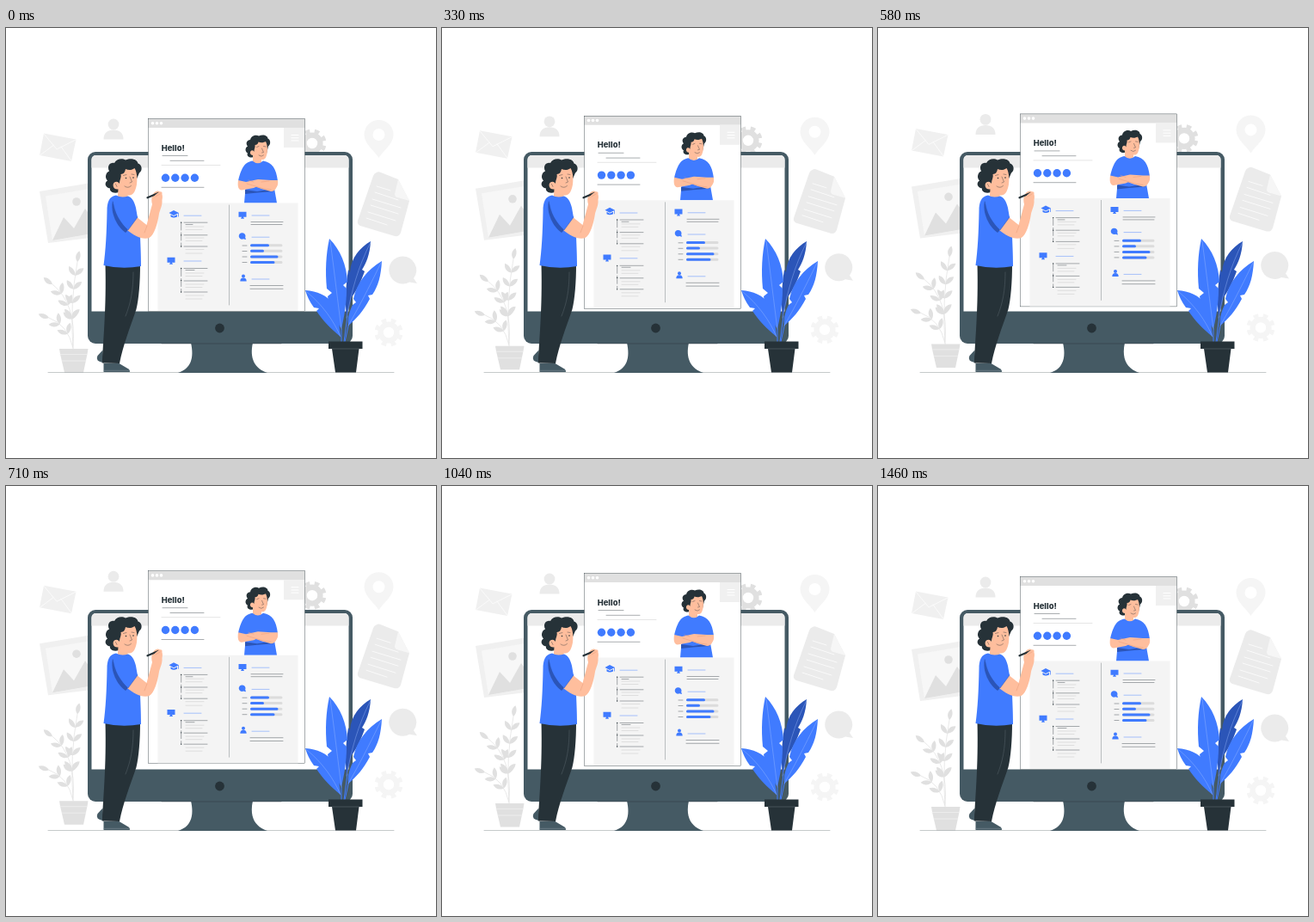
These frames come from a looping animation (500x500 px, 1500 ms). An HTML page:

```html
<!DOCTYPE html>
<html lang="en">
<head>
<meta charset="utf-8">
<title>Resume illustration</title>
<style>
  html, body { margin: 0; width: 100%; height: 100%; overflow: hidden; background: #fff; }
  svg { display: block; width: 100vw; height: 100vh; }
  path { stroke-linecap: round; stroke-linejoin: round; }
  .ink { fill: none; stroke: #263238; stroke-width: .4; }
  .faint { fill: none; stroke: #b4b4b4; stroke-width: .35; }
  .blueline { fill: none; stroke: #407bff; stroke-width: .45; }
  .blue { fill: #407bff; }
  .dark { fill: #263238; }
  .steel { fill: #455a64; }
  .skin { fill: #ffbe9d; }
  .shade { fill: #2b55b8; }
  .pale { fill: #e0e0e0; }
  .mist { fill: #f0f0f0; }
  .vein { fill: none; stroke: #a0bdff; stroke-width: .4; }
  text { font: 800 9.4px Inter, sans-serif; }
</style>
</head>
<body>
<svg viewBox="0 0 500 500">
  <defs>
    <g id="gear" fill="none">
      <circle r="9.4" stroke="currentColor" stroke-width="6.4"/>
      <circle r="14" stroke="currentColor" stroke-width="5" pathLength="16" stroke-dasharray="1 1" stroke-dashoffset="1.5"/>
    </g>
    <path id="screen" class="blue" d="M-4.5-4H4.5V2H-4.5ZM-1 2H1L2 4H-2Z"/>
  </defs>

  <!-- Background icons -->
  <g class="float">
    <path class="mist" d="M44 122.5L81.500 129.500L76 155L39 148Z"/>
    <path d="M44 123L59 141L81 130M39.500 148L55 136.500M76 154.500L64 138" fill="none" stroke="#fff" stroke-width=".7"/>
    <circle cx="125" cy="112" r="6.400" fill="#ebebeb"/>
    <path d="M113.500 129.500C113.500 122 118 118.500 125 118.500S136.500 122 136.500 129.500Z" fill="#ebebeb"/>
    <path class="mist" d="M39 190L105 179L114 242L49 250Z"/>
    <path d="M46 195.500L106 185.500L112 237L54 247Z" fill="#f7f7f7"/>
    <path class="pale" d="M54 247L67 220L79 233L92 210L112 237Z"/>
    <circle class="pale" cx="82" cy="202" r="4.800"/>
    <use href="#gear" x="356" y="134" color="#e0e0e0"/>
    <path fill="#f5f5f5" fill-rule="evenodd" d="M433.500 151C428 142 416.500 135 416.500 124A17 17 0 0 1 450.500 124C450.500 135 439 142 433.500 151ZM433.500 117A7 7 0 1 0 433.500 131A7 7 0 1 0 433.500 117"/>
    <path d="M431 168Q433 166.500 436 168L456 176L469 201L459 238Q457 243 452 242L412 230Q408 228 409 224L427 172Q428 169 431 168Z" fill="#ebebeb"/>
    <path d="M456 176L452 193Q452 196 455 197L469 201Z" fill="#f6f6f6"/>
    <path d="M431 184L447 189M429 191L456 200M426 199L459 209M424 206L456 216M421 214L453 224M419 221L443 229" stroke="#fafafa"/>
    <path d="M461 265.500A16 16 0 1 0 469 295.500L478 297L474 291A16 16 0 0 0 461 265.500Z" fill="#ebebeb"/>
    <use href="#gear" x="445" y="354" color="#f5f5f5"/>
    <g id="plant" class="pale">
      <path d="M62 373H95.500L94.500 379L90 400.500H68L63 379Z"/>
      <path d="M63 379.500H94.500M65 387H93" stroke="#f2f2f2" stroke-width=".7"/>
    </g>
  </g>

  <path d="M49 400.500H451" class="ink" stroke-opacity=".65"/>

  <!-- Monitor -->
  <path class="steel" d="M215 366C219 384 215 396 200 401H304C289 396 283 384 287 366Z"/>
  <rect class="steel" x="95" y="144" width="308" height="223" rx="9"/>
  <path d="M99.500 329.500V153.500Q99.500 148 105 148H393Q398.500 148 398.500 153.500V329.500Z" fill="#fff"/>
  <path d="M99.500 162.500V153.500Q99.500 148 105 148H393Q398.500 148 398.500 153.500V162.500Z" fill="#ebebeb"/>
  <path class="ink" d="M181 367H320"/>
  <circle class="dark" cx="248.500" cy="349" r="5.400"/>

  <!-- Resume page -->
  <g class="float">
    <rect x="165.500" y="105.500" width="182" height="224" fill="#fff"/>
    <path class="pale" d="M165.500 105.500H347.500V116H165.500Z"/>
    <g fill="#fff"><circle cx="170.500" cy="110.700" r="1.800"/><circle cx="175.500" cy="110.700" r="1.800"/><circle cx="180.500" cy="110.700" r="1.800"/></g>
    <path class="mist" d="M323 116H347.500V139H323Z"/>
    <path d="M332 124.500H340M332 127.800H340M332 131H340" stroke="#fff"/>
    <rect class="ink" x="165.500" y="105.500" width="182" height="224"/>
    <text class="dark" x="180.700" y="142.500">Hello!</text>
    <path class="ink" d="M182 148.500H211M191 154.300H230M181 185.300H230"/>
    <path class="faint" d="M181 159.500H249"/>
    <g class="blue"><circle cx="185.500" cy="174.300" r="4.700"/><circle cx="196.800" cy="174.300" r="4.700"/><circle cx="208.100" cy="174.300" r="4.700"/><circle cx="219.400" cy="174.300" r="4.700"/></g>

    <!-- Portrait -->
    <path class="dark" d="M286 150.500C282 151 279.500 148 281 145.500C277.500 143.500 278 139 281 137.500C278 134 280.500 130 284 130C285 125 291 123.500 294 125.500C299 123 304.500 125 304.500 128.500C308 130 308 135.500 305 137.500L303 146Z"/>
    <path class="skin" d="M287 157V148C283.500 148 283 143.500 285.500 142.500C287 142 288 143 288.500 144C288.500 140 290 139 289.500 136C292 136 293 134.500 293.500 132.500C297 134 300 133 302 132C305 138 304 146 302.500 149.500C301.500 152.500 299 153.500 297 153V157Q292 160 287 157Z"/>
    <path class="ink" d="M291.500 138.500L294 137.500M299.500 137.500L302 138M297.500 140L299.500 144.500L297.500 145M294 148Q297 150.500 299.500 148"/>
    <path class="blue" d="M286.500 154.500C279 156 274 160 270 178L279 181L277 203.500H315L311 181L316 178C314 163 310 157 299 154.500Q293 160 286.500 154.500Z"/>
    <path class="shade" d="M278 188L292 190L311 187V190L292 191.500L278 193Z"/>
    <path class="skin" d="M270 177C269 184 270 188 274 188.500L288 186L299 181L310 185C314 188 317 184 316 177L308 177L293 176L279 179Z"/>
    <path class="skin" d="M278 180L297 187L308 190Q313 190 315 184L300 178Z"/>
    <path d="M280 181L300 187L308 188M282 177L288 179M297 179L306 178" fill="none" stroke="#e69a78" stroke-width=".5"/>

    <path d="M176.500 203.500H339.500V329H176.500Z" fill="#f4f4f4"/>
    <path class="ink" d="M259.500 206V322" stroke-opacity=".7"/>

    <!-- Left column -->
    <path class="blue" d="M189.500 215L195 212L201 215L195 218ZM191.500 217L195 219L199 217V219.500Q195 221.500 191.500 219.500ZM200 215H200.700V219.500H200Z"/>
    <use href="#screen" x="192" y="270.800"/>
    <path class="blueline" d="M207 218.200H227M207 271H227"/>
    <path class="ink" d="M203.700 226V254M203.700 279.500V307" stroke-dasharray="9 3"/>
    <path d="M203.700 226.200v0M203.700 240.800v0M203.700 254v0M203.700 279.500v0M203.700 293.600v0M203.700 307v0" stroke="#263238" stroke-width="1.300"/>
    <path class="ink" d="M207 226.200H234M209 228.500H217M207 240.800H234M207 254H234M207 279.500H234M209 281.500H219M207 294H234M207 307H234"/>
    <path class="faint" d="M209 231H230M209 234.500H228M209 244H230M209 247.500H228M209 257.500H230M209 262H228M209 285H230M209 288.500H228M209 298H230M209 301.500H228M209 311H230M209 315H228"/>

    <!-- Right column -->
    <use href="#screen" x="275" y="217.700"/>
    <path class="blue" d="M275 238.300A3.700 3.700 0 1 0 276 245.300L279 246L278.200 243.500A3.700 3.700 0 0 0 275 238.300ZM272.300 294.500Q272.300 290.500 276 290.500T279.700 294.500Z"/>
    <circle class="blue" cx="276" cy="288.500" r="2"/>
    <path class="blueline" d="M286 218H306M286 243.200H306M286 292H306"/>
    <path class="ink" d="M285 225.500H322M285 228.500H321M284 299.500H322M284 303.300H322M275 253H280M275 259.500H280M275 266H280M275 272.500H280"/>
    <path d="M285.500 252.800H320M285.500 259.300H320M285.500 266H320M285.500 272.500H320" stroke="#dcdcdc" stroke-width="3"/>
    <path d="M285.500 252.800H304.500M285.500 259.300H298.500M285.500 266H315M285.500 272.500H311" stroke="#407bff" stroke-width="3"/>
  </g>

  <!-- Writer -->
  <path class="steel" d="M112.500 374.500L106.500 381Q104.500 385 108 387.500L113.500 389.500Z"/>
  <path class="steel" d="M113.500 390H131.500L142.500 396.500Q145 399 143.500 400H113.500Z"/>
  <path d="M113.500 398.300H143" stroke="#8a9ba3" stroke-width=".5"/>
  <path class="dark" d="M115.500 275H156C156 295 154.500 315 151.500 327C144 349 136 369 132 390L112 389.500C112.500 368 117 325 115.500 275Z"/>
  <path d="M148 284C148 305 145 320 139 335" fill="none" stroke="#65737a" stroke-width=".4"/>
  <path class="dark" d="M131 191C125 193 120 190 121 186.500C115 185.500 114 180 118 177.500C114.500 174 116 168 120 166.500C117 160.500 121 156 126 157C128 152 135 151 139 153.500C146 150.500 153 153 153.500 157.500C158.500 159 159 166 155 168.500L150 180Z"/>
  <path class="skin" d="M129.500 200L130.500 187.500C125 188.500 123 182 126 179.500C129 177.500 131 179.500 132 181C132 176 134.500 174 133.500 170C137 170 138.500 167 139 164C143 166 147 165 149.500 163C153 168 153.500 182 150 189C148 194 144 195 141.500 194.500V201Z"/>
  <path class="ink" d="M136.500 171.500L140 170.500M146 170L149 170.500M144 173L146.500 179L144 180M138 184Q142 187 145.500 183.500M127.500 181.500L129 184.500"/>
  <circle class="dark" cx="139.500" cy="174.500" r=".8"/><circle class="dark" cx="148" cy="174" r=".8"/>
  <path class="blue" d="M128 194.500C120 196 117.500 202 117.500 213C117 238 116 258 113.500 276Q135 281 157 277C157 258 156 248 156 238L151 209C149 201 146 197 142 195.500Q134 198 128 194.500Z"/>
  <path class="shade" d="M124 201C121 215 129 231 139 238L146 231L140 222Z"/>
  <path class="skin" d="M141 235L151 219L163.500 229L170 205C168 198 170 191 176 189.500C181 190 183 194 181.500 200C182 207 179 211 178 216C176 229 172 241 166.500 244C159 247 148 241 141 235Z"/>
  <path class="blue" d="M124.500 201C131 194 142 197 146 207L153 220L142 235C134 228 125 214 124.500 201Z"/>
  <path d="M125 205C127 218 134 228 142 235L153 220" fill="none" stroke="#2b55b8" stroke-width=".5"/>
  <path d="M164.500 197.300L177 192" stroke="#263238" stroke-width="2.200"/>
  <path class="skin" d="M172 196Q176 191 180 190.300Q182.500 191 181 194L175 199Z"/>
  <path d="M174 196L179 193M164 230L161 238" stroke="#e69a78" stroke-width=".5"/>

  <!-- Blue plant -->
  <path d="M390 350V365M397 335L393 365M399 342L394 365" fill="none" stroke="#407bff"/>
  <path class="shade" d="M424 248C423 264 419 273 414 281L417 283C413 294 408 305 402 313L396 337C394 319 395 300 398 281L400 284C401 267 412 255 424 248Z"/>
  <path class="blue" d="M437 271C436 288 433 300 426 310L421 311L423 315C416 328 408 338 398 346C397 338 399 330 403 322L407 319L404 315C408 296 420 281 437 271Z"/>
  <path class="blue" d="M376 245C389 258 396 276 397 295L392 299L396 303C396 322 393 337 390 350C382 338 376 326 374 312L379 308L373 303C371 283 372 263 376 245Z"/>
  <path class="blue" d="M348 305C362 306 373 311 380 320L378 324L382 324C386 334 388 346 389 359C378 350 368 340 361 329L364 326L358 325C353 318 350 312 348 305Z"/>
  <path class="vein" d="M424 249C409 279 402 305 396 337M436 273C421 304 409 327 398 346M377 248C382 285 386 320 390 350M350 307C368 322 381 340 389 359"/>
  <path class="dark" d="M375 364.500H414.500V373H410.500L407 400.500H383L379 373H375Z"/>
  <path d="M379 373H410.500" stroke="#65737a" stroke-width=".5"/>
</svg>
<script>
  const plant = document.getElementById('plant');
  const floats = document.querySelectorAll('.float');

  function add(attrs) {
    const path = document.createElementNS('http://www.w3.org/2000/svg', 'path');
    for (const key in attrs) path.setAttribute(key, attrs[key]);
    plant.prepend(path);
  }

  // A quadratic stem with pairs of leaves along it and one at the tip.
  function branch(x0, y0, x1, y1, x2, y2, pairs) {
    add({ d: `M${x0} ${y0}Q${x1} ${y1} ${x2} ${y2}`, fill: 'none', stroke: '#e0e0e0', 'stroke-width': .7 });
    for (let i = 0; i <= pairs; i++) {
      const u = .35 + .65 * i / pairs, v = 1 - u;
      const x = v * v * x0 + 2 * u * v * x1 + u * u * x2;
      const y = v * v * y0 + 2 * u * v * y1 + u * u * y2;
      const angle = Math.atan2(v * (y1 - y0) + u * (y2 - y1), v * (x1 - x0) + u * (x2 - x1)) * 180 / Math.PI;
      for (const turn of i < pairs ? [-42, 42] : [0]) {
        add({
          d: 'M0 0C4-4 9-4 13 0C9 3 4 3 0 0Z',
          transform: `translate(${x} ${y}) rotate(${angle + turn})`
        });
      }
    }
  }
  branch(78, 373, 74, 320, 83, 272, 4);
  branch(78, 370, 82, 320, 54, 298, 3);
  branch(78, 372, 72, 345, 50, 337, 2);

  const LOOP = 1500, STEPS = 36, RISE = 7;
  function draw(now) {
    const step = Math.floor((now % LOOP + 5) * STEPS / LOOP) % STEPS;
    const half = (STEPS - 1) / 2;
    const lift = RISE * (1 - Math.abs(step - half) / half);
    for (const g of floats) g.setAttribute('transform', `translate(0 ${-lift})`);
    requestAnimationFrame(draw);
  }
  draw(0);
</script>
</body>
</html>
```
